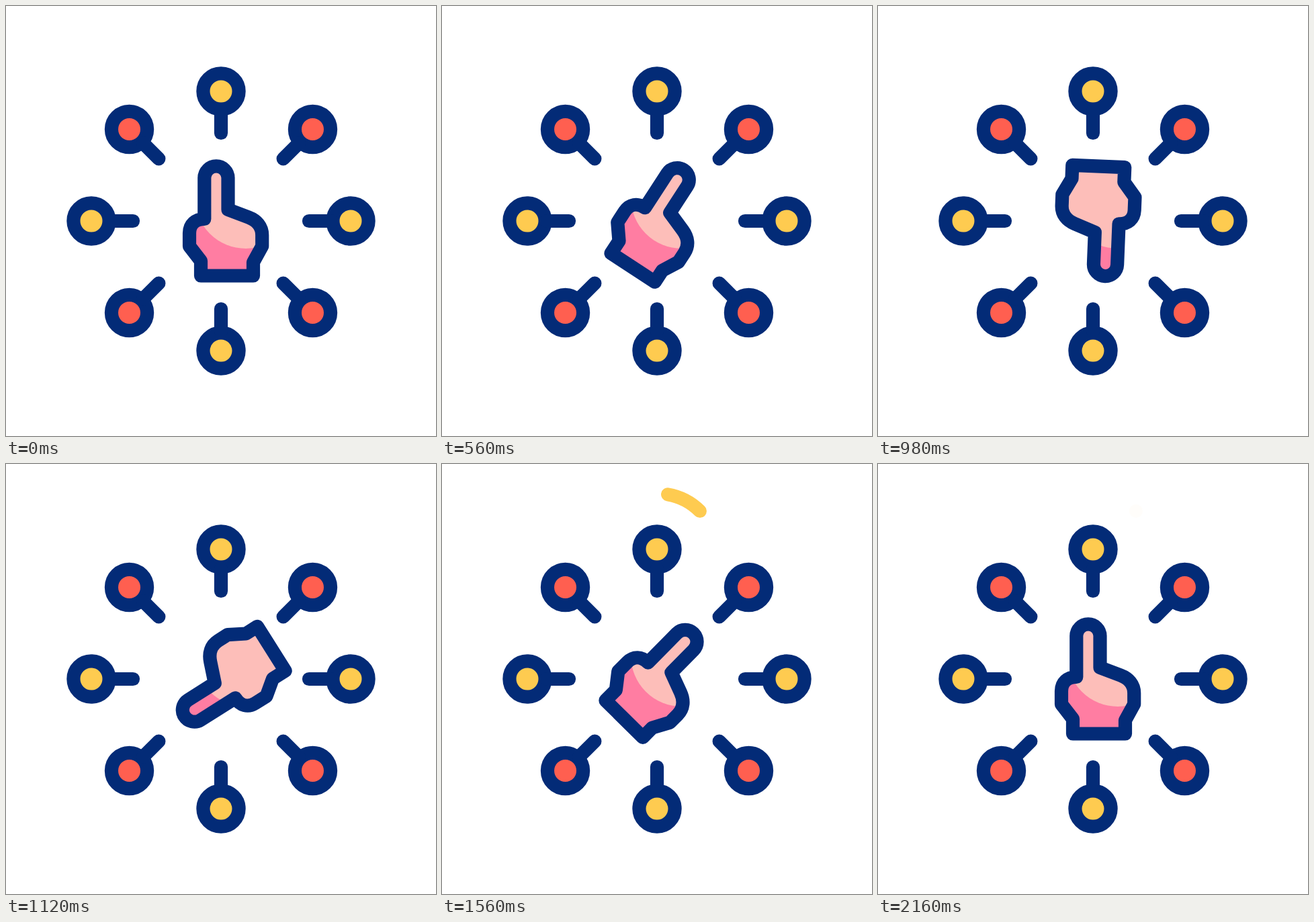
Write an HTML page that moves like this. It is 640 px wide and 640 px high and loops after 2.4 s.

```html
<!DOCTYPE html>
<html lang="en">
<head>
<meta charset="utf-8">
<title>Pointing hand</title>
<style>
  html, body { margin: 0; height: 100%; overflow: hidden; background: #fff; }
  svg { display: block; width: 100%; height: 100%; }
</style>
</head>
<body>
<svg viewBox="0 0 640 640" fill="none" stroke-linecap="round" stroke-linejoin="round">
  <defs>
    <path id="hand" d="M295.3 317V256a17.6 17.6 0 0 1 35.2 0V303L361 314.500C373 319 381.200 328 381.200 341V357.500L368 381.500V401.500H290V379.500L273 357.500V338C273 325 282 317 295.300 317Z"/>
    <clipPath id="inside"><use class="turn" href="#hand"/></clipPath>
  </defs>
  <g id="nodes"></g>
  <g clip-path="url(#inside)">
    <rect width="640" height="640" fill="#ff7da2"/>
    <circle cx="357" cy="285" r="76" fill="#fdbeb9"/>
  </g>
  <use class="turn" href="#hand" stroke="#032b77" stroke-width="20.2"/>
  <path id="arc" stroke="#fecb50" stroke-width="20"/>
</svg>
<script>
const LOOP = 2400;
const NAVY = '#032b77', RED = '#ff5f50', YELLOW = '#fecb50';

// Node index (clockwise from the top): fade in from, to, fade out from, to
const glows = {
  7: [220, 340, 380, 500],
  2: [620, 740, 860, 980],
  5: [1140, 1240, 1300, 1400],
  0: [1600, 1720, 2000, 2120]
};

// Hand turns: start, end, change in degrees
const turns = [
  [0, 320, -45],
  [340, 740, 135],
  [750, 1150, 150],
  [1314, 1655, -240]
];

const clamp = x => Math.min(1, Math.max(0, x));
const ramp = (t, from, to) => clamp((t - from) / (to - from));
const ease = (t, from, to) => {
  const x = ramp(t, from, to);
  return x * x * (3 - 2 * x);
};

const pin = (color, width, extra = '') =>
  `<g stroke="${color}" stroke-width="${width}" ${extra}>
    <circle cx="320" cy="127" r="26.6"/><path d="M320 156V189"/></g>`;

let markup = '';
for (let i = 0; i < 8; i++) {
  const [fill, glow] = i % 2 ? [RED, YELLOW] : [YELLOW, RED];
  markup += `<g transform="rotate(${i * 45} 320 320)">
    <circle cx="320" cy="127" r="20" fill="${fill}"/>
    ${pin(NAVY, 20.2)}${i in glows ? pin(glow, 22, `id="glow${i}"`) : ''}</g>`;
}
document.getElementById('nodes').innerHTML = markup;

const arc = document.getElementById('arc');
const hands = document.querySelectorAll('.turn');

const arcPoint = deg => {
  const a = deg * Math.PI / 180;
  return `${321 + 89 * Math.cos(a)} ${133 + 89 * Math.sin(a)}`;
};

// The sweep runs anticlockwise from the upper right and back to it
function drawArc(t) {
  const tail = 360 * ease(t, 1560, 1980);
  const head = Math.max(360 * ease(t, 1500, 1815), tail + 0.1);
  const large = head - tail > 180 ? 1 : 0;
  arc.setAttribute('d', `M${arcPoint(-45 - tail)}A89 89 0 ${large} 0 ${arcPoint(-45 - head)}`);
  arc.setAttribute('opacity', t < 1500 ? 0 : 1 - 0.97 * ramp(t, 1900, 2160));
}

function draw(now) {
  const t = now % LOOP;
  const angle = turns.reduce((sum, [from, to, by]) => sum + by * ease(t, from, to), 0);
  hands.forEach(h => h.setAttribute('transform', `rotate(${angle} 327 320)`));
  for (const [i, [a, b, c, d]] of Object.entries(glows))
    document.getElementById('glow' + i).setAttribute('opacity', ramp(t, a, b) - ramp(t, c, d));
  drawArc(t);
}

const start = performance.now();
function tick() {
  draw(performance.now() - start);
  requestAnimationFrame(tick);
}
tick();
</script>
</body>
</html>
```
